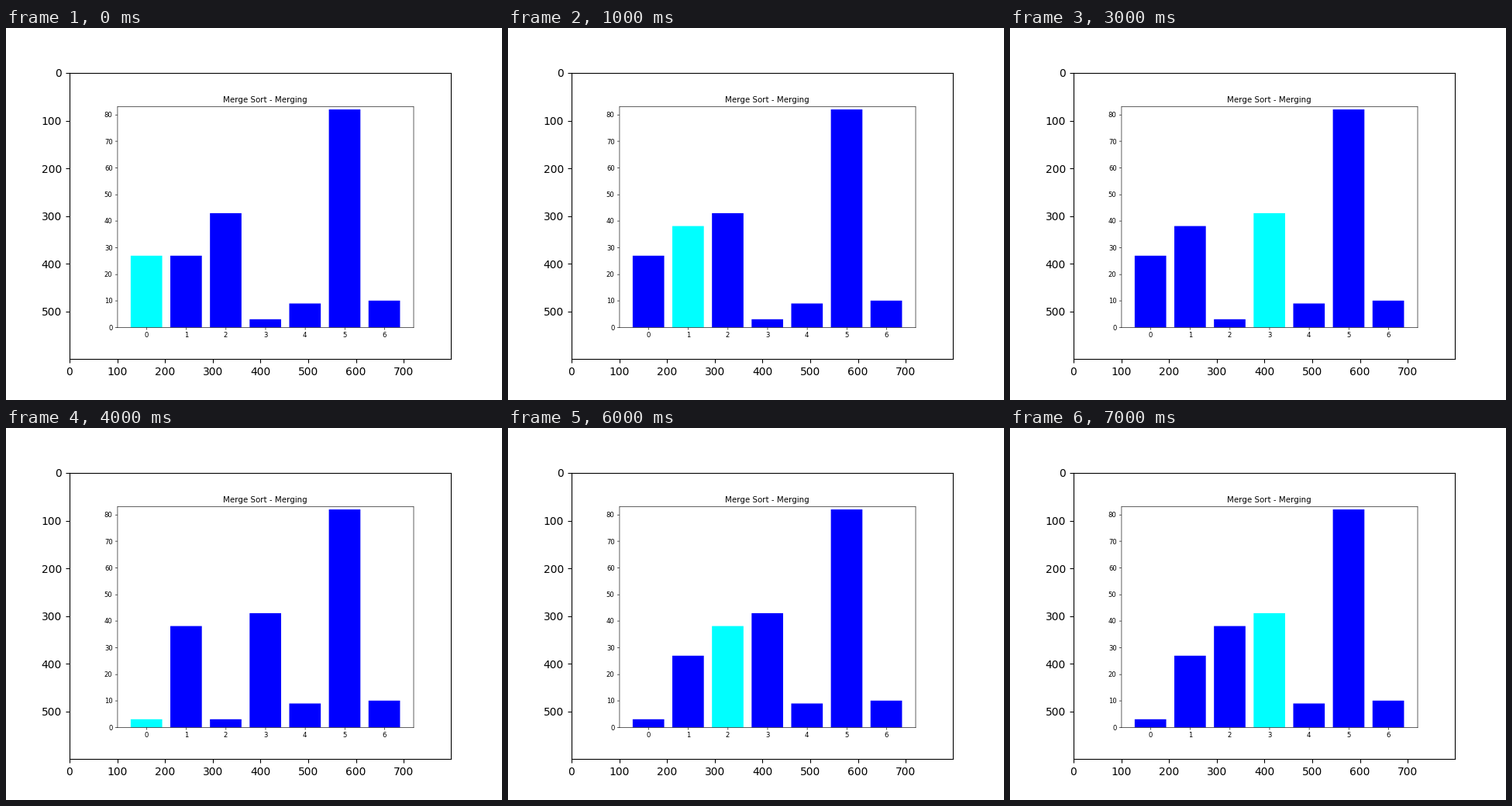
Animation of 640x480 px, one loop 8000 ms. Source, as a matplotlib script:

```python
import math

import matplotlib.pyplot as plt
from matplotlib.animation import FuncAnimation
from matplotlib.lines import Line2D
from matplotlib.patches import Rectangle
from matplotlib.transforms import Affine2D

START = [38, 27, 43, 3, 9, 82, 10]
# (bar, new height) for each merge step
WRITES = [(0, 27), (1, 38), (2, 3), (3, 43),
          (0, 3), (1, 27), (2, 38), (3, 43)]

# Inner chart, laid out on an 800 x 600 picture with y pointing down
LEFT, RIGHT, TOP, BOTTOM = 100, 720, 72, 534
Y_MAX = 83
X_MIN, X_MAX = -0.74, 6.74
SCALE = 493 / 800
PT = 100 / 72

plt.rcParams["font.family"] = "DejaVu Sans"
fig, ax = plt.subplots(figsize=(6.4, 4.8), dpi=100)
ax.set_xlim(-0.5, 799.5)
ax.set_ylim(599.5, -0.5)
ax.set_aspect("equal")

picture = Affine2D().scale(SCALE, -370 / 600).translate(82, 423)


def chart_x(value):
    return LEFT + (value - X_MIN) / (X_MAX - X_MIN) * (RIGHT - LEFT)


def chart_y(value):
    return BOTTOM - value / Y_MAX * (BOTTOM - TOP)


def snap(value):
    return math.floor(value + 0.5)


def line(xs, ys, cap="butt"):
    ax.add_artist(Line2D(xs, ys, color="black", lw=SCALE / PT, snap=False,
                         solid_capstyle=cap, transform=picture,
                         clip_on=False, zorder=3))


def label(x, y, text, size=10, **align):
    ax.text(x, y, text, fontsize=size * SCALE, transform=picture, **align)


def draw_frame():
    x0, x1, y0, y1 = (v + 0.5 for v in (LEFT, RIGHT, TOP, BOTTOM))
    for x in (x0, x1):
        line([x, x], [y0, y1], "projecting")
    for y in (y0, y1):
        line([x0, x1], [y, y], "projecting")

    tick, gap = 3.5 * PT, 7 * PT
    for i in range(len(START)):
        x = snap(chart_x(i)) + 0.5
        line([x, x], [y1, y1 + tick])
        label(chart_x(i), BOTTOM + gap, str(i), ha="center", va="top")
    for v in range(0, 81, 10):
        y = snap(chart_y(v)) + 0.5
        line([x0 - tick, x0], [y, y])
        label(LEFT - gap, chart_y(v), str(v), ha="right",
              va="center_baseline")
    label((LEFT + RIGHT) / 2, TOP - 6 * PT, "Merge Sort - Merging", 12,
          ha="center", va="baseline")


def make_bar(i):
    x0, x1 = snap(chart_x(i - 0.4)), snap(chart_x(i + 0.4))
    bar = Rectangle((x0, BOTTOM), x1 - x0, 0, lw=0, snap=False,
                    transform=picture, zorder=2)
    return ax.add_artist(bar)


draw_frame()
bars = [make_bar(i) for i in range(len(START))]


def update(step):
    heights = list(START)
    for i, value in WRITES[:step + 1]:
        heights[i] = value
    active = WRITES[step][0]
    for i, (bar, value) in enumerate(zip(bars, heights)):
        bar.set_height(snap(chart_y(value)) - BOTTOM)
        bar.set_facecolor("cyan" if i == active else "blue")
    return bars


anim = FuncAnimation(fig, update, frames=len(WRITES), interval=1000,
                     repeat=True, repeat_delay=0)
plt.show()
```
